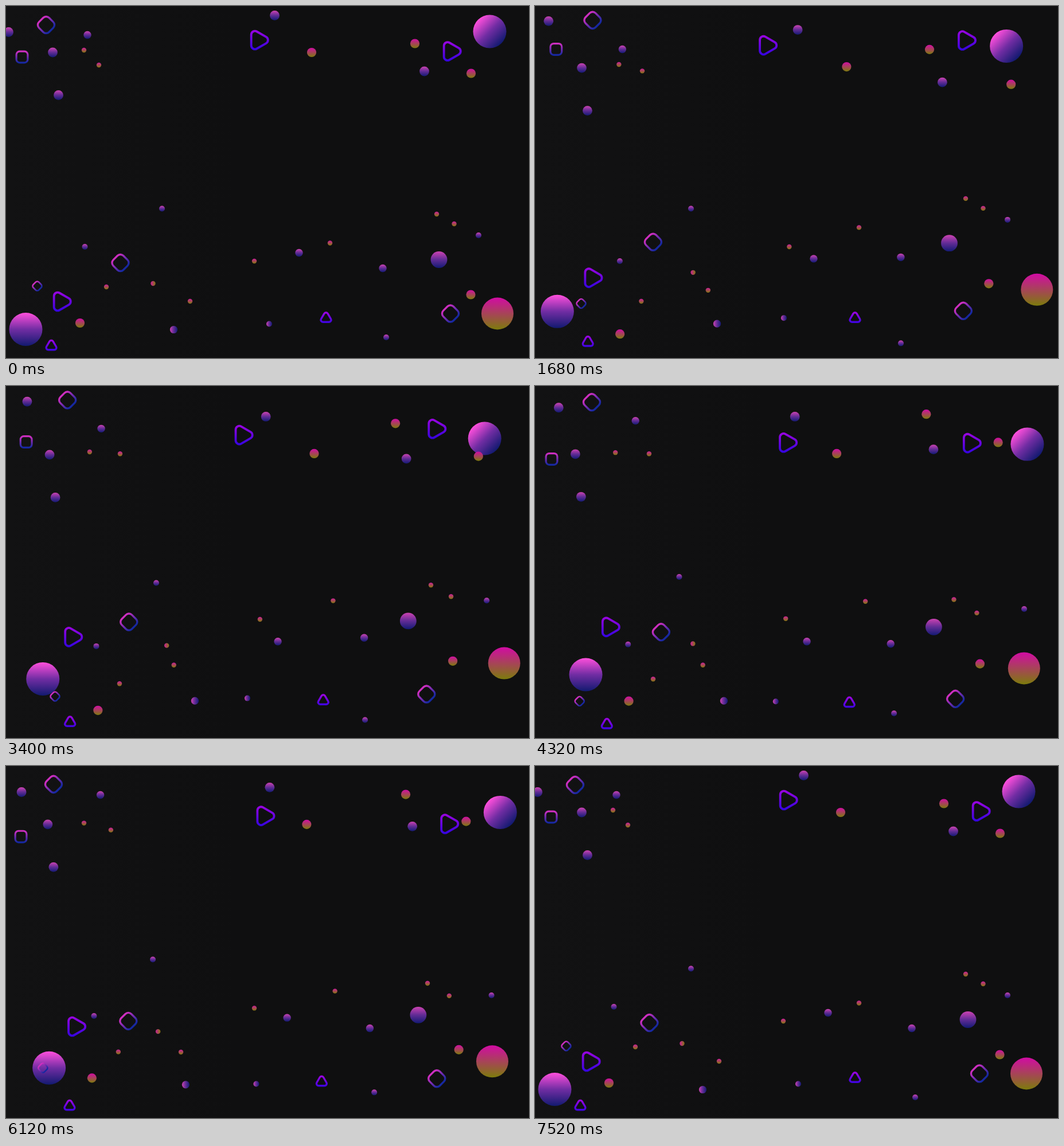
Animation, 912 px wide and 614 px high, one loop 7.62 s. Source, as an HTML page with a canvas:

```html
<!DOCTYPE html>
<html lang="en">
<head>
<meta charset="utf-8">
<title>Drifting shapes</title>
<style>
html, body { margin: 0; width: 100%; height: 100%; overflow: hidden; background: #0f0f10; }
canvas { display: block; }
</style>
</head>
<body>
<canvas id="stage" width="912" height="614"></canvas>
<script>
const ctx = document.getElementById('stage').getContext('2d');
const TICK = 40, LOOP = 7620, STEPS = 62, REACH = 40;
const WINDS = 'E ESE SE SSE S SSW SW WSW W WNW NW NNW N NNE NE ENE'.split(' ');

const PINK = ['#ff4fdc', '#712da3', '#121a70'];
const PURPLE = ['#cc42b2', '#612c95', '#141a74'];
const ORANGE = ['#d20ba4', '#7c7c0c'];
const DULL = ['#cc1c98', '#84780f'];
const FRAME = ['#d02ec0', '#1428a0'];
const VIOLET = ['#9804e0', '#3604e0'];

function gradient(colors, rx, ry) {
  const g = ctx.createLinearGradient(-rx, -ry, rx, ry);
  colors.forEach((color, i) => g.addColorStop(i / (colors.length - 1), color));
  return g;
}

// Shape makers return a function that draws around the local origin.
function ball(colors, r, dx = 0, dy = 1) {
  const fill = gradient(colors, r * dx, r * dy);
  return () => {
    ctx.beginPath();
    ctx.arc(0, 0, r, 0, Math.PI * 2);
    ctx.fillStyle = fill;
    ctx.fill();
  };
}

function outline(colors, half, width, trace) {
  const stroke = gradient(colors, 0, half);
  return () => {
    ctx.beginPath();
    trace();
    ctx.lineWidth = width;
    ctx.strokeStyle = stroke;
    ctx.stroke();
  };
}

function square(side, width, turn = 0) {
  return outline(FRAME, side / 2, width, () => {
    ctx.rotate(turn);
    ctx.roundRect(-side / 2, -side / 2, side, side, side * 0.29);
  });
}

// Equilateral, with rounded corners; r reaches from the centre to a sharp corner.
function triangle(r, width, turn) {
  const corner = i => {
    const angle = turn + i * Math.PI * 2 / 3;
    return [r * Math.cos(angle), r * Math.sin(angle)];
  };
  return outline(VIOLET, r * 0.7, width, () => {
    const [x, y] = corner(1.5);
    ctx.moveTo(x / 2, y / 2);
    for (const i of [2, 3, 4]) ctx.arcTo(...corner(i), ...corner(i + 1), r * 0.27);
    ctx.closePath();
  });
}

const shapes = [];

// Each path has three key points.
function travel(draw, ...paths) {
  for (const path of paths) shapes.push({ draw, path });
}

// Each item has a home and the headings, as compass points, of two outlying stops.
function drift(draw, ...items) {
  for (const [x, y, ...headings] of items) {
    const stops = headings.map(heading => {
      const angle = WINDS.indexOf(heading) * Math.PI / 8;
      return heading ? [x + REACH * Math.cos(angle), y + REACH * Math.sin(angle)] : [x, y];
    });
    travel(draw, [[x, y], ...stops]);
  }
}

travel(ball(PINK, 29, 0.7, 0.7), [[843.5, 44.5], [812, 82], [876, 109]]);
travel(ball(PINK, 29), [[34.5, 564], [41, 518], [106.5, 498]]);
travel(ball(ORANGE, 28), [[857, 536.5], [884, 475], [841, 499]]);
travel(ball(PURPLE, 14.4), [[755, 442.5], [707, 400], [691, 428]]);

drift(ball(PURPLE, 8.4),
  [4.5, 45.5, 'NE', 'E'],
  [81.5, 81, 'S', 'SSW'],
  [91.5, 155.5, 'S', 'SSW'],
  [468.5, 16.5, 'SSW', 'SSW'],
  [729.5, 114, 'SW', 'WNW']);
drift(ball(PURPLE, 6.7),
  [142, 50.5, 'SSE', 'E'],
  [511, 430.5, 'WSW', 'WSW'],
  [657, 457.5, 'NW', 'W']);
drift(ball(PURPLE, 6.6, 1, 0), [292.5, 564.5, 'ENE', 'ENE']);
drift(ball(PURPLE, 5),
  [272, 353.5, '', 'NW'],
  [137.5, 420, 'SSE', 'SE'],
  [663, 578, 'WSW', 'WNW'],
  [824, 400, 'N', 'E']);
drift(ball(PURPLE, 5, 1, 0), [459, 554.5, 'WNW', 'W']);

drift(ball(ORANGE, 8.1),
  [533, 81, 'SSE', 'SSW'],
  [713, 65.5, 'WSW', 'NW'],
  [811, 117.5, 'SE', 'NNW'],
  [129, 553, 'SE', 'ENE'],
  [810.5, 503.5, 'NW', 'WNW']);
drift(ball(DULL, 4.2),
  [136, 77, 'SSE', 'S'],
  [162, 103, 'ESE', 'ESE'],
  [175, 490, 'SSE', 'ESE'],
  [321, 515, 'NW', 'NW'],
  [433, 445, 'NNE', 'N'],
  [565, 413.5, 'N', 'NNE'],
  [751, 363, 'N', 'SW'],
  [781.5, 380, 'N', 'SSW']);
drift(ball(DULL, 4.2, 1, 0), [256.5, 484, 'NE', 'NNE']);

travel(square(19.8, 3.2), [[28, 89], [41, 69], [24.5, 149.5]]);
travel(square(24.8, 3.4, -Math.PI / 4),
  [[70, 33], [115, 21], [93, 31]],
  [[199.5, 448], [209, 394.5], [224, 442.5]],
  [[775, 536.5], [733.5, 529.5], [733, 552]]);
travel(square(13.6, 2.6, -Math.PI / 4), [[54.5, 488.5], [93, 533.5], [72, 556]]);
travel(triangle(23.7, 3.8, 0),
  [[439.5, 59.5], [387, 73], [458.5, 108.5]],
  [[775.5, 79], [739, 51], [767.5, 118]],
  [[95.5, 515.5], [101, 454.5], [140.5, 407.5]]);
travel(triangle(13.4, 3.4, -Math.PI / 2),
  [[79, 593], [98.5, 583], [135.5, 593]],
  [[558, 544.5], [558, 544.5], [544.5, 556]]);

const backdrop = ctx.createLinearGradient(0, 0, 400, 0);
backdrop.addColorStop(0, '#121213');
backdrop.addColorStop(1, '#0f0f10');

function render(time) {
  // Three straight legs, each followed by a one-tick rest.
  const tick = Math.min(Math.floor((time % LOOP) / TICK), 3 * STEPS + 2);
  const leg = Math.floor(tick / (STEPS + 1));
  const k = (tick % (STEPS + 1)) / STEPS;
  ctx.fillStyle = backdrop;
  ctx.fillRect(0, 0, 912, 614);
  for (const { draw, path } of shapes) {
    const [x, y] = path[leg], [toX, toY] = path[(leg + 1) % 3];
    ctx.save();
    ctx.translate(x + (toX - x) * k, y + (toY - y) * k);
    draw();
    ctx.restore();
  }
}

const start = performance.now();
function loop() {
  render(performance.now() - start);
  requestAnimationFrame(loop);
}
loop();
</script>
</body>
</html>
```
